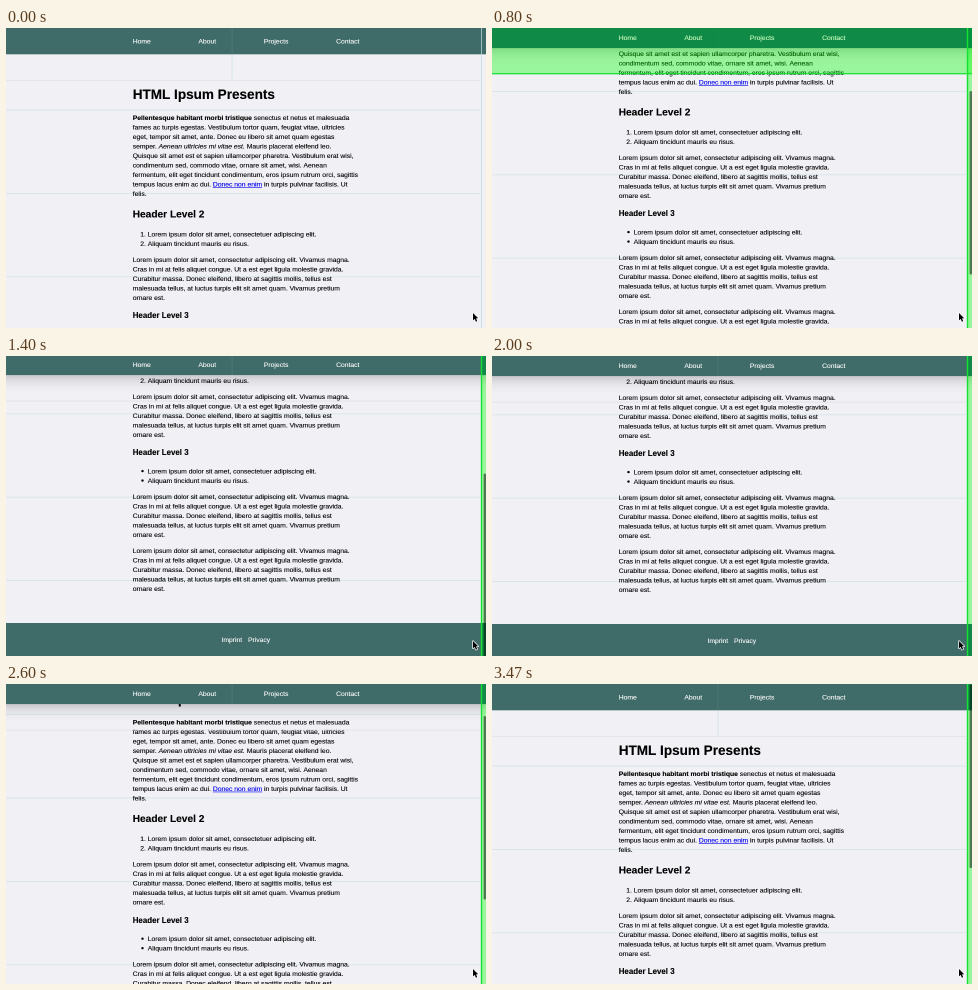
Write an HTML page with a canvas that moves like this. It is 480 px wide and 300 px high and loops after 3540 ms.

```html
<!DOCTYPE html>
<html lang="en">
<head>
<meta charset="utf-8">
<title>Shrinking header on scroll</title>
<style>
html, body { margin: 0; width: 100%; height: 100%; overflow: hidden; background: #f1f0f5; }
canvas { display: block; width: 480px; height: 300px; }
</style>
</head>
<body>
<canvas id="stage" width="960" height="600"></canvas>
<script>
const ctx = document.getElementById('stage').getContext('2d');
ctx.scale(2, 2); // half-pixel text positions

const W = 480, H = 300, LOOP = 3540, STEP = 1000 / 15;
const FAMILY = '"Liberation Sans", Arial, sans-serif';
const EM = 6.77, LEAD = EM * 1.4, LEFT = 126.7;
const MAX_SCROLL = 190, PAGE_H = 490, TILE = 83.4;
const TEAL = '#3f6b69', LINE = '#d3e4e9', LIME = '#16e032';

// [time in ms, scroll offset in px]
const scrollKeys = [
  [0, 0], [330, 53.2], [800, 102], [1250, 193], [1400, 191], [1600, 190],
  [2000, 190], [2300, 138], [2600, 51.4], [2900, 9], [3200, 0], [3540, 0]
];

const intro = [
  [['Pellentesque habitant morbi tristique', 'bold'], [' senectus et netus et malesuada']],
  'fames ac turpis egestas. Vestibulum tortor quam, feugiat vitae, ultricies',
  'eget, tempor sit amet, ante. Donec eu libero sit amet quam egestas',
  [['semper. '], ['Aenean ultricies mi vitae est.', 'italic'], [' Mauris placerat eleifend leo.']],
  'Quisque sit amet est et sapien ullamcorper pharetra. Vestibulum erat wisi,',
  'condimentum sed, commodo vitae, ornare sit amet, wisi. Aenean',
  'fermentum, elit eget tincidunt condimentum, eros ipsum rutrum orci, sagittis',
  [['tempus lacus enim ac dui. '], ['Donec non enim', 'link'], [' in turpis pulvinar facilisis. Ut']],
  'felis.'
];
const lorem = [
  'Lorem ipsum dolor sit amet, consectetur adipiscing elit. Vivamus magna.',
  'Cras in mi at felis aliquet congue. Ut a est eget ligula molestie gravida.',
  'Curabitur massa. Donec eleifend, libero at sagittis mollis, tellus est',
  'malesuada tellus, at luctus turpis elit sit amet quam. Vivamus pretium',
  'ornare est.'
];
const items = [
  'Lorem ipsum dolor sit amet, consectetuer adipiscing elit.',
  'Aliquam tincidunt mauris eu risus.'
];
const nav = [['Home', 126.7], ['About', 192.4], ['Projects', 257.9], ['Contact', 330.1]];

const clamp = v => Math.min(1, Math.max(0, v));
const smooth = v => { v = clamp(v); return v * v * (3 - 2 * v); };
const ramp = (t, from, to) => smooth((t - from) / (to - from));

function slope(i) {
  const gradient = j => (scrollKeys[j + 1][1] - scrollKeys[j][1]) / (scrollKeys[j + 1][0] - scrollKeys[j][0]);
  if (i === 0) return gradient(0);
  if (i === scrollKeys.length - 1) return 0;
  const a = gradient(i - 1), b = gradient(i);
  return a * b > 0 ? 2 * a * b / (a + b) : 0;
}

// Monotone cubic through the scroll keys
function scrollAt(t) {
  let i = 0;
  while (i < scrollKeys.length - 2 && t >= scrollKeys[i + 1][0]) i++;
  const [t0, a] = scrollKeys[i], [t1, b] = scrollKeys[i + 1];
  const d = t1 - t0, u = (t - t0) / d, u2 = u * u, u3 = u2 * u;
  return a * (2 * u3 - 3 * u2 + 1) + b * (3 * u2 - 2 * u3)
    + d * (slope(i) * (u3 - 2 * u2 + u) + slope(i + 1) * (u3 - u2));
}

function rect(x, y, w, h, color) {
  ctx.fillStyle = color;
  ctx.fillRect(x, y, w, h);
}

// Fonts are set ten times larger and scaled down to keep fractional advances.
// A hairline stroke gives the slightly heavier rendering of smoothed text.
function text(str, x, y, size = EM, style = '', color = '#000') {
  ctx.save();
  ctx.translate(x, y);
  ctx.scale(0.1, 0.1);
  ctx.font = `${style} ${size * 10}px ${FAMILY}`;
  ctx.fillStyle = ctx.strokeStyle = color;
  ctx.lineWidth = 1.2;
  ctx.fillText(str, 0, 0);
  ctx.strokeText(str, 0, 0);
  const width = ctx.measureText(str).width / 10;
  ctx.restore();
  return width;
}

function paragraph(lines, y) {
  lines.forEach((line, i) => {
    const base = y + i * LEAD;
    let x = LEFT;
    for (const [str, style] of Array.isArray(line) ? line : [[line]]) {
      const link = style === 'link';
      const width = text(str, x, base, EM, link ? '' : style, link ? '#0000ee' : '#000');
      if (link) rect(x, base + 0.7, width, 0.6, '#0000ee');
      x += width;
    }
  });
}

function list(y, ordered) {
  items.forEach((item, i) => {
    const base = y + i * LEAD;
    text(item, LEFT + 15, base);
    if (ordered) {
      text(`${i + 1}.`, LEFT + 7.5, base);
    } else {
      ctx.fillStyle = '#000';
      ctx.beginPath();
      ctx.arc(LEFT + 9.8, base - 2.3, 1.2, 0, Math.PI * 2);
      ctx.fill();
    }
  });
}

function drawPage(scroll) {
  ctx.save();
  ctx.translate(0, -scroll);
  for (let y = 82; y < PAGE_H; y += TILE) rect(0, y - 0.4, 474, 0.8, LINE);
  text('HTML Ipsum Presents', LEFT, 71.1, EM * 2, 'bold');
  paragraph(intro, 92);
  text('Header Level 2', LEFT, 189.4, EM * 1.5, 'bold');
  list(208.4, true);
  paragraph(lorem, 234.1);
  text('Header Level 3', LEFT, 290.2, EM * 1.17, 'bold');
  list(308.4, false);
  paragraph(lorem, 334.1);
  paragraph(lorem, 388.2);
  rect(0, 458, W, 40, TEAL);
  text('Imprint', 215.5, 477.2, EM, '', '#fff');
  text('Privacy', 242, 477.2, EM, '', '#fff');
  ctx.restore();
}

function drawHeader(height, shrink, flash) {
  const bottom = height + 26;
  rect(0, bottom - 0.4, 474, 0.8, '#e0e1e6');
  rect(225.7, height, 0.7, 26, `rgba(190,222,228,${0.8 * (1 - shrink)})`);
  if (shrink > 0) {
    const shadow = ctx.createLinearGradient(0, height, 0, height + 18);
    [[0, 0.17], [0.3, 0.08], [0.65, 0.02], [1, 0]].forEach(([at, alpha]) =>
      shadow.addColorStop(at, `rgba(0,0,0,${alpha * shrink})`));
    rect(0, height, W, 18, shadow);
  }
  rect(0, 0, W, height, TEAL);
  rect(225.7, 0, 0.7, height, 'rgba(130,165,165,.3)');
  for (const [label, x] of nav) text(label, x, 15.4 - shrink * 3.3, EM, '', '#fff');
  if (flash > 0) {
    ctx.globalAlpha = flash;
    rect(0, 0, W, height, 'rgba(0,150,60,.75)');
    rect(0, height, W, 26, 'rgba(0,255,0,.36)');
    rect(0, bottom - 1, W, 1.2, LIME);
    for (const [label, x] of nav) text(label, x, 15.4 - shrink * 3.3, EM, '', '#c4f7b8');
    ctx.globalAlpha = 1;
  }
}

function drawScrollbar(scroll, headerH, thumbAlpha) {
  const footerY = Math.min(H, 458 - scroll);
  rect(475, 0, 5, headerH, 'rgba(0,150,60,.7)');
  rect(475, headerH, 5, footerY - headerH, 'rgba(0,255,0,.36)');
  rect(475, footerY, 5, H - footerY, 'rgba(0,150,60,.7)');
  rect(474.8, 0, 1.4, H, LIME);
  const ratio = H / PAGE_H;
  ctx.fillStyle = `rgba(0,0,0,${0.5 * thumbAlpha})`;
  ctx.beginPath();
  ctx.roundRect(477.6, scroll * ratio + 0.5, 2.4, H * ratio, 1.2);
  ctx.fill();
}

function drawCursor() {
  ctx.save();
  ctx.translate(467, 285);
  ctx.beginPath();
  [[0, 0], [0, 7.4], [1.7, 5.9], [2.9, 8.7], [4.2, 8.1], [3, 5.4], [5.2, 5.3]]
    .forEach(([x, y]) => ctx.lineTo(x, y));
  ctx.closePath();
  ctx.lineJoin = 'round';
  ctx.lineWidth = 1.4;
  ctx.strokeStyle = '#fff';
  ctx.stroke();
  ctx.fillStyle = '#000';
  ctx.fill();
  ctx.restore();
}

function flashAt(t, start) {
  return t < start ? 0 : clamp((start + 260 - t) / 130);
}

function draw(t) {
  const scroll = scrollAt(t);
  const over = Math.max(0, scroll - MAX_SCROLL);
  const shrink = ramp(t, 470, 740) - ramp(t, 2670, 2940);
  const height = 26.3 - 6.2 * shrink;
  const flash = Math.max(flashAt(t, 725), flashAt(t, 2925));
  const thumbAlpha = t < 2010 ? 1 - ramp(t, 1700, 1950) : 1;

  rect(0, 0, W, H, '#f1f0f5');
  drawPage(scroll);
  ctx.save();
  ctx.translate(0, -over);
  drawHeader(height, shrink, flash);
  ctx.restore();
  rect(475, 0, 0.9, H, 'rgba(190,222,228,.8)');
  if (t > 0) drawScrollbar(scroll, height - over, thumbAlpha);
  drawCursor();
}

const start = performance.now();
function tick() {
  const t = (performance.now() - start) % LOOP;
  draw(Math.min(52, Math.floor((t + 4) / STEP)) * STEP);
  requestAnimationFrame(tick);
}
tick();
</script>
</body>
</html>
```
